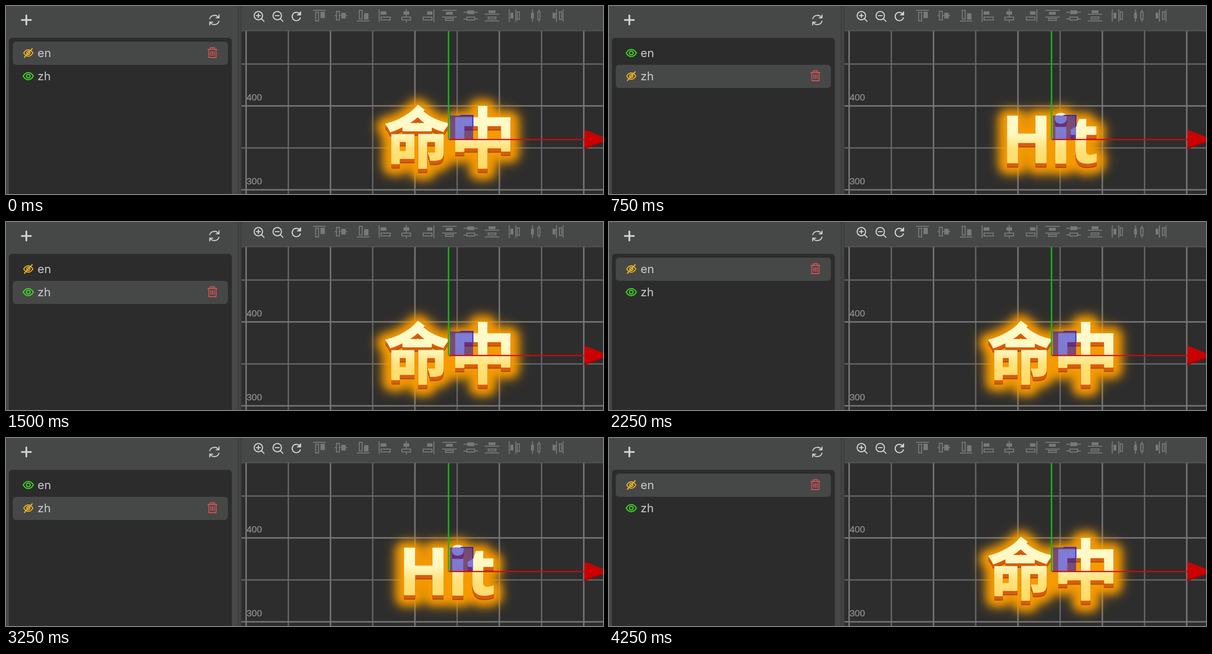
Write an HTML page that moves like this. It is 1232 by 390 pixels and loops after 4.5 s.

```html
<!DOCTYPE html>
<html lang="en">
<head>
<meta charset="utf-8">
<title>Language preview</title>
<style>
  html, body { margin: 0; width: 100%; height: 100%; overflow: hidden; background: #2d2d2d; }
  svg { display: block; width: 100%; height: 100%; }
  .line { fill: none; stroke-linecap: round; stroke-linejoin: round; }
  .row { font: 24px Inter, sans-serif; fill: #cacaca; }
  .ruler { font: 19px "Liberation Sans", Arial, sans-serif; fill: #8c8c8c; stroke: #8c8c8c; stroke-width: .4; }
  .zh { font: 700 135px "Noto Sans CJK SC", "Noto Sans CJK", "Noto Sans CJK JP", sans-serif; }
  .en { font: 700 135px "Open Sans", sans-serif; letter-spacing: -2px; }
</style>
</head>
<body>
<svg viewBox="0 0 1232 390" xmlns="http://www.w3.org/2000/svg">
  <defs>
    <linearGradient id="gold" gradientUnits="userSpaceOnUse" x1="0" y1="206" x2="0" y2="337">
      <stop offset="0" stop-color="#fffbd0"/>
      <stop offset=".45" stop-color="#fff8c0"/>
      <stop offset=".68" stop-color="#ffe27a"/>
      <stop offset="1" stop-color="#ffda66"/>
    </linearGradient>
    <filter id="near" filterUnits="userSpaceOnUse" x="660" y="90" width="520" height="340"><feGaussianBlur stdDeviation="9"/></filter>
    <filter id="far" filterUnits="userSpaceOnUse" x="660" y="90" width="520" height="340"><feGaussianBlur stdDeviation="14"/></filter>
    <text id="word-zh" class="zh" x="781.5" y="324">命中</text>
    <text id="word-en" class="en" x="810.5" y="324.5">Hit</text>
    <g id="eye" class="line" stroke-width="2.2">
      <path d="M-10.5 0Q-6-7.5 0-7.5T10.5 0Q6 7.5 0 7.5T-10.5 0Z"/>
      <circle r="3.8"/>
    </g>
    <g id="open" stroke="#3fe01c"><use href="#eye"/></g>
    <g id="shut" stroke="#f2b524">
      <use href="#eye" transform="scale(.9)"/>
      <path class="line" stroke-width="2.2" d="M-8 9L8-9"/>
    </g>
    <path id="turn" d="M-9.5-2.5A10 10 0 0 1 8.5-5M9.6-10.5V-4.5H3.6"/>
  </defs>

  <g id="grid"></g>
  <text class="ruler" x="496.5" y="196">400</text>
  <text class="ruler" x="496.5" y="370">300</text>
  <g id="words"></g>

  <g id="gizmo">
    <rect x="916" y="227" width="48" height="50" fill="#0000e6" fill-opacity=".5"/>
    <path d="M938 227H963.5V250" fill="none" stroke="#2a20cc" stroke-width="2"/>
    <path d="M913.2 52V277" stroke="#14b816" stroke-width="3"/>
    <path d="M914 277H1194" stroke="#d40808" stroke-width="2.6"/>
    <path d="M1193.5 256.5L1246 277L1193.5 297Z" fill="#cc0000"/>
    <path d="M1193.5 293L1246 277L1193.5 297Z" fill="#a80000"/>
  </g>

  <path d="M0 0H1232V51H486V390H0Z" fill="#464847"/>
  <path d="M486 51.5H1232" stroke="#5a5b5a" stroke-width="1.5"/>
  <path d="M479.5 0V390M485 0V390" stroke="#3a3b3a" stroke-width="2"/>
  <path d="M6 390V74Q6 66 14 66H458Q466 66 466 74V390Z" fill="#2c2c2c"/>

  <g class="line" stroke="#d2d2d2">
    <path d="M32.5 29H51.5M42 19.5V38.5" stroke-width="3.6"/>
    <g stroke-width="2.1" transform="translate(430 29)">
      <use href="#turn"/><use href="#turn" transform="rotate(180)"/>
    </g>
    <g stroke-width="2.2">
      <circle cx="520.8" cy="20" r="8.7"/>
      <path d="M527 26.200L532.500 31.700M516.800 20H524.800M520.800 16V24"/>
      <circle cx="559.8" cy="20" r="8.7"/>
      <path d="M566 26.200L571.500 31.700M555.800 20H563.800"/>
      <path d="M607.5 24.5A8.700 8.700 0 1 1 605.500 15.700L607.500 17.500"/>
    </g>
    <path d="M608.5 11.500V19H601Z" fill="#d2d2d2" stroke-width="1"/>
  </g>
  <g id="tools"></g>

  <g id="hover">
    <rect x="14" y="74" width="444" height="48" rx="7" fill="#464847"/>
    <path class="line" stroke="#db5252" stroke-width="1.8"
      d="M416.5 90H435.500M421.500 90V86.500H430.500V90M418.500 90V107H433.500V90M422.500 94.500V102.500M426 94.500V102.500M429.500 94.500V102.500"/>
  </g>
  <use id="eye-en" x="46" y="97.5"/>
  <use id="eye-zh" x="46" y="145.5"/>
  <text class="row" x="65" y="106">en</text>
  <text class="row" x="65" y="154">zh</text>
</svg>
<script>
  const LOOP = 4500;
  const $ = id => document.getElementById(id);
  const within = (t, spans) => spans.some(([a, b]) => t >= a && t < b);

  // Grid: every second line is a stronger one.
  function grid() {
    let s = '<rect x="486" y="51" width="746" height="339" fill="#2d2d2d"/>';
    const style = major => major
      ? 'stroke="#767676" stroke-width="3"'
      : 'stroke="#666" stroke-width="2.8"';
    for (let i = 0; i < 9; i++)
      s += `<path d="M${495.5 + i * 87.1} 51V390" ${style(i % 2 === 0)}/>`;
    for (let i = 0; i < 4; i++)
      s += `<path d="M486 ${120.3 + i * 87}H1232" ${style(i % 2 === 1)}/>`;
    return s;
  }

  // A word: soft glow, extruded lower edge, golden face.
  function word(lang) {
    const layer = (color, width, extra = '') =>
      `<use href="#word-${lang}" fill="${color}" stroke="${color}" stroke-width="${width}" stroke-linejoin="round" ${extra}/>`;
    let s = layer('#f59a00', 44, 'y="5" filter="url(#far)" opacity=".35"') +
      layer('#f59a00', 36, 'y="5" filter="url(#near)"');
    for (let y = 9; y > 0; y--)
      s += layer(y > 7 ? '#a04c08' : '#dc5c0a', 2.6, `y="${y}"`);
    return `<g id="${lang}">${s}${layer('url(#gold)', 2.6)}</g>`;
  }

  // Alignment icons: guide lines, one solid bar, one hollow bar.
  function tools() {
    const C = '#777978';
    const guide = d => `<path d="${d}" stroke="${C}" stroke-width="2" fill="none"/>`;
    const solid = (x, y, w, h) => `<rect x="${x}" y="${y}" width="${w}" height="${h}" fill="${C}"/>`;
    const hollow = (x, y, w, h) =>
      `<rect x="${x + 1}" y="${y + 1}" width="${w - 2}" height="${h - 2}" fill="#464847" stroke="${C}" stroke-width="2"/>`;
    let s = '';
    // top, middle, bottom
    s += guide('M634 9H660') + hollow(638, 12, 8, 20) + solid(649, 12, 9, 13);
    s += guide('M678 20H704') + hollow(681, 10, 8, 20) + solid(692, 14, 9, 12);
    s += guide('M724 31H750') + hollow(728, 8, 8, 20) + solid(739, 15, 9, 13);
    // left, centre, right
    s += guide('M770 7V33') + solid(773, 11, 12, 7) + hollow(773, 22, 21, 8);
    s += guide('M826 6V34') + solid(820, 11, 12, 7) + hollow(816, 22, 20, 8);
    s += guide('M883 7V33') + solid(869, 11, 11, 7) + hollow(860, 22, 20, 8);
    // distribute in a column, then in a row
    [[915, 9, 12], [959, 13, 9], [1003, 17, 9]].forEach(([x, y, top]) => {
      const h = x === 959 ? 8 : 6;
      s += guide(`M${x - 15} ${y}h30m-30 14h30`) + solid(x - 7, top, 14, h) + hollow(x - 9, top + 13, 18, h);
    });
    [[1038.5, 1041], [1086.5, 1083.5], [1136, 1128]].forEach(([x, left]) => {
      s += guide(`M${x} 7V33M${x + 13.5} 7V33`) + solid(left, 14, 6, 12) + hollow(left + 13, 11, 6.5, 18);
    });
    return s;
  }

  $('grid').innerHTML = grid();
  $('words').innerHTML = word('zh') + word('en');
  $('tools').innerHTML = tools();

  function draw(t) {
    const english = within(t, [[250, 1250], [2500, 3500]]);
    const lower = within(t, [[750, 1750], [2500, 3500]]);
    $('en').style.display = english ? '' : 'none';
    $('zh').style.display = english ? 'none' : '';
    $('eye-en').setAttribute('href', english ? '#open' : '#shut');
    $('eye-zh').setAttribute('href', english ? '#shut' : '#open');
    $('hover').setAttribute('transform', `translate(0 ${lower ? 48 : 0})`);
  }

  const start = performance.now();
  function tick() {
    draw((performance.now() - start) % LOOP);
    requestAnimationFrame(tick);
  }
  tick();
</script>
</body>
</html>
```
